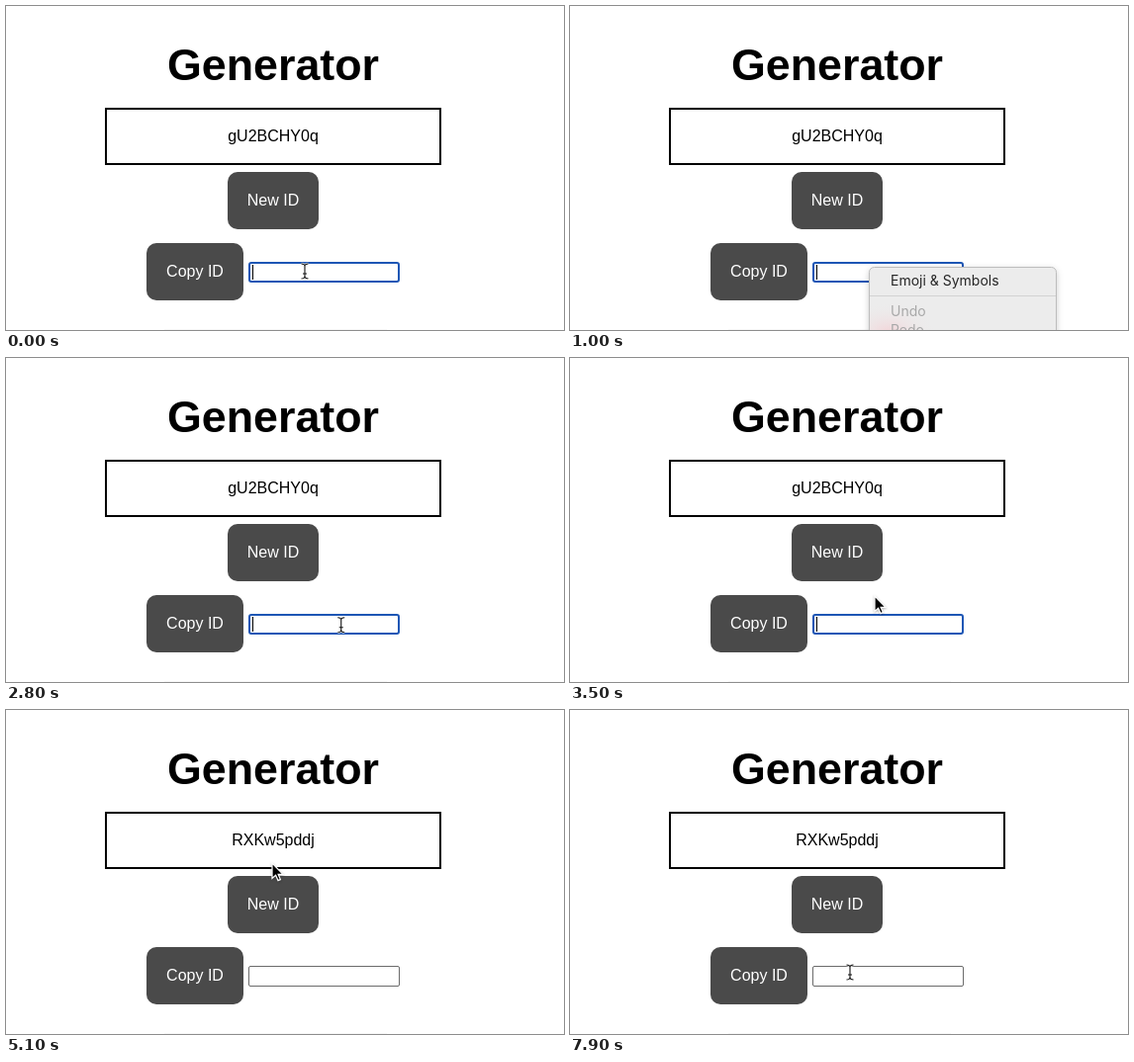
Recreate the animation shown at these times as an HTML page. Size 564x328 px, loop 8 s.

```html
<!DOCTYPE html>
<html lang="en">
<head>
<meta charset="utf-8">
<title>Generator</title>
<style>
  html, body { margin: 0; width: 100%; height: 100%; overflow: hidden; background: #fff; }
  svg { display: block; width: 564px; height: 328px; }
  text { font: 16px "Liberation Sans", Arial, sans-serif; }
  .page { text-anchor: middle; }
  .page h1, .title { font-size: 44.8px; font-weight: bold; }
  .button { fill: #4a4a4a; }
  .label { fill: #fff; }
  #menu text { font: 14px Inter, sans-serif; fill: #262626; }
  #menu .disabled { fill: #a8a8a8; }
  #menu rect { filter: drop-shadow(0 2px 3px rgba(0, 0, 0, .2)); }
  #menu .plain { filter: none; }
</style>
</head>
<body>
<svg viewBox="0 0 564 328">
  <defs>
    <radialGradient id="tint">
      <stop offset="0" stop-color="#f3d5d9"/>
      <stop offset="1" stop-color="#ececec" stop-opacity="0"/>
    </radialGradient>
  </defs>

  <rect x="160" y="327" width="225" height="1" fill="#f8f8f8"/>
  <g class="page">
    <text class="title" x="270" y="75">Generator</text>
    <rect x="101" y="104" width="338" height="56" fill="none" stroke="#000" stroke-width="2"/>
    <text id="code" x="270" y="137"></text>
    <rect class="button" x="224" y="168" width="92" height="58" rx="10"/>
    <text class="label" x="270" y="202">New ID</text>
    <rect class="button" x="142" y="240" width="98" height="58" rx="10"/>
    <text class="label" x="191" y="274">Copy ID</text>
  </g>

  <rect id="idle" x="245.5" y="259.5" width="152" height="20" rx="1.5" fill="#fff" stroke="#6b6b6b"/>
  <g id="focused">
    <rect x="246" y="260" width="151" height="19" rx="2" fill="#fff" stroke="#1d56b5" stroke-width="2"/>
    <rect id="caret" x="249" y="262" width="1" height="15"/>
  </g>

  <g id="menu">
    <rect x="302.5" y="264.5" width="189" height="90" rx="5" fill="#ececec" stroke="#bdbdbd"/>
    <ellipse cx="322" cy="330" rx="48" ry="30" fill="url(#tint)" clip-path="inset(0 0 0 29px)"/>
    <rect id="highlight" class="plain" x="303" y="269" width="188" height="19" fill="#2f7cf6"/>
    <text id="item" x="324" y="283">Emoji &amp; Symbols</text>
    <rect class="plain" x="303" y="293" width="188" height="1" fill="#d2d2d2"/>
    <text class="disabled" x="324" y="314">Undo</text>
    <text class="disabled" x="324" y="333">Redo</text>
  </g>

  <g id="cursor">
    <g id="beam" fill="none">
      <path id="stem" d="M-3.5-7.5Q0-7.5 0-5Q0-7.5 3.5-7.5M0-5V5M-3.5 7.5Q0 7.5 0 5Q0 7.5 3.5 7.5M-2 2.5H2" stroke="#fff" stroke-width="2.4" opacity=".8"/>
      <use href="#stem" style="display:none"/>
      <path d="M-3.5-7.5Q0-7.5 0-5Q0-7.5 3.5-7.5M0-5V5M-3.5 7.5Q0 7.5 0 5Q0 7.5 3.5 7.5M-2 2.5H2" stroke="#111" stroke-width="1.1"/>
    </g>
    <path id="arrow" d="M0 0V15.5L3.6 12.2L6 17.6L8.4 16.6L6.1 11.3H11Z" stroke="#fff" stroke-width="1.2"
          style="filter:drop-shadow(0 1px 1px rgba(0,0,0,.3))"/>
  </g>
</svg>
<script>
const LOOP = 8000, STEP = 100;
const el = id => document.getElementById(id);
const show = (id, on) => { el(id).style.display = on ? "" : "none"; };
const within = (t, from, to) => t >= from && t < to;

// time, x, y, pointer shape from that time on
const path = [
  [0, 302, 268.5, "beam"],
  [100, 302, 266, "arrow"],
  [300, 302, 266, "arrow"],
  [600, 312, 332, "arrow"],
  [1400, 312, 332, "arrow"],
  [1600, 310, 296, "beam"],
  [1900, 307, 279, "beam"],
  [2200, 305, 272, "beam"],
  [2400, 305, 271, "beam"],
  [2500, 305, 271, "beam"],
  [2900, 350, 270, "beam"],
  [3200, 330, 250, "arrow"],
  [3400, 308, 241, "arrow"],
  [3500, 308, 241, "arrow"],
  [3800, 309, 224, "arrow"],
  [4200, 302, 212, "arrow"],
  [4600, 302, 212, "arrow"],
  [5100, 269, 155, "arrow"],
  [5300, 246, 134, "beam"],
  [5400, 246, 134, "beam"],
  [5700, 226, 133, "beam"],
  [5800, 226, 133, "beam"],
  [6200, 308, 134, "beam"],
  [6400, 309, 134.5, "beam"],
  [6500, 306, 150, "arrow"],
  [6800, 282, 258, "beam"],
  [6900, 277, 264, "beam"],
  [7400, 277, 264, "beam"],
  [7700, 283, 265.5, "beam"],
  [LOOP, 283, 265.5, "beam"]
];

function pointerAt(t) {
  const i = path.findIndex(key => key[0] > t);
  const [t0, x0, y0, shape] = path[i - 1], [t1, x1, y1] = path[i];
  const k = (t - t0) / (t1 - t0);
  return { x: x0 + (x1 - x0) * k, y: y0 + (y1 - y0) * k, shape };
}

function render(now) {
  const t = Math.floor((now % LOOP) / STEP) * STEP;
  el("code").textContent = t < 4500 ? "gU2BCHY0q" : "RXKw5pddj";

  const focus = t < 4400;
  show("idle", !focus);
  show("focused", focus);
  show("caret", !(within(t, 2100, 2600) || within(t, 3100, 3500) || t >= 4000));

  const hover = within(t, 400, 500);
  show("menu", within(t, 100, 1500));
  el("menu").style.opacity = t >= 1400 ? 0.4 : 1;
  show("highlight", hover);
  el("item").style.fill = hover ? "#fff" : "";

  const { x, y, shape } = pointerAt(t);
  el("cursor").setAttribute("transform", `translate(${x} ${y})`);
  show("beam", shape === "beam");
  show("arrow", shape === "arrow");
}

const start = performance.now();
function tick() {
  render(performance.now() - start);
  requestAnimationFrame(tick);
}
tick();
</script>
</body>
</html>
```
